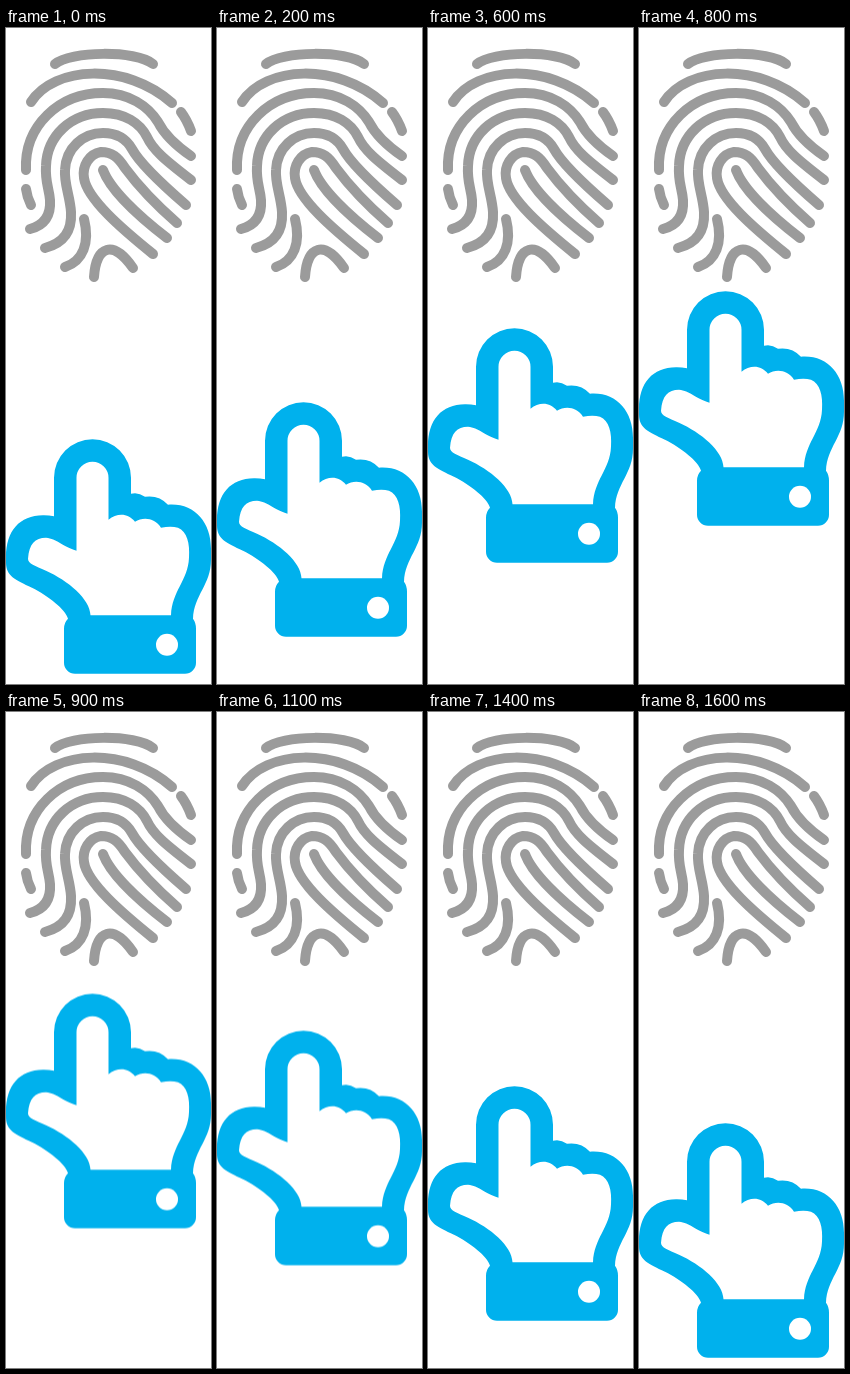
An HTML page for the animation above (1.7 s loop, 205 by 656 pixels).

```html
<!DOCTYPE html>
<html lang="en">
<head>
<meta charset="utf-8">
<title>Touch to scan</title>
<style>
  html, body { margin: 0; width: 100%; height: 100%; overflow: hidden; background: #fff; }
  svg { display: block; width: 205px; height: 656px; }
  .print { fill: none; stroke: #9b9b9b; stroke-width: 10; stroke-linecap: round; stroke-linejoin: round; }
  .blue { fill: #00b1ed; }
  .white { fill: #fff; }
</style>
</head>
<body>
<svg viewBox="0 0 205 656">
  <g class="print">
    <path d="M49 36C64 23 130 22 147 36"/>
    <path d="M25 74C48 38 120 34 166 75"/>
    <path d="M175 84Q181 92 185 103"/>
    <path d="M20 142C18 98 53 65 97 65C123 65 142 78 152 94C159 108 172 119 185 128"/>
    <path d="M20 161Q21 169 25 177"/>
    <path d="M24 201C39 197 45 187 44 172C43 160 39 154 40 138C41 108 65 85 97 85C119 85 134 95 141 109C147 122 159 132 185 152"/>
    <path d="M39 220C58 215 66 203 65 184C64 168 58 156 59 142C60 120 77 105 97 105C112 105 121 112 126 121C133 134 158 158 180 177"/>
    <path d="M59 239C77 233 84 215 78 191"/>
    <path d="M171 195C155 181 136 163 119 140C112 129 106 124 95 124C83 126 76 138 78 150C81 171 116 201 147 226"/>
    <path d="M97 142C104 161 131 187 161 210"/>
    <path d="M88 249C90 218 107 211 127 240"/>
  </g>
  <g id="hand">
    <g transform="translate(0 .75)">
      <path class="blue" d="M48 449a38.500 38.500 0 0 1 77 0V465Q132 463 139 468Q153 466 162 476C188 474 205 493 205 520V531C205 556 188 566 187 590Q190 594 190 600V634a11 11 0 0 1-11 11H69a11 11 0 0 1-11-11V600Q58 594 62 590C60 581 42 567 26 559C9 551 0 547 0 534V528C0 502 14 486 38 486.500Q43 486.500 48 487.500Z"/>
      <path class="white" d="M70.500 449a16 16 0 0 1 32 0V491C111 484 122 484 129 493C137 488 149 489 155 499Q165 497 172 499C181 503 184 514 183 529C182 552 166 562 165 586.500H84.500C84 570 62 552 40 542C29 537 22 535 22 530C23 515 29 509 40 509C51 510 55 517 70.500 522Z"/>
      <circle class="white" cx="161" cy="616" r="11"/>
    </g>
  </g>
</svg>
<script>
  const FRAMES = 17, TICK = 100, RISE = 18.5;

  // Rises for eight ticks, sinks for eight, then rests for one.
  const poses = Array.from({ length: FRAMES + 1 }, (_, i) => ({
    offset: i / FRAMES,
    easing: 'step-end',
    transform: `translateY(${-RISE * Math.max(0, Math.min(i, 16 - i))}px)`
  }));

  document.getElementById('hand').animate(poses, {
    duration: FRAMES * TICK,
    iterations: Infinity
  });
</script>
</body>
</html>
```
